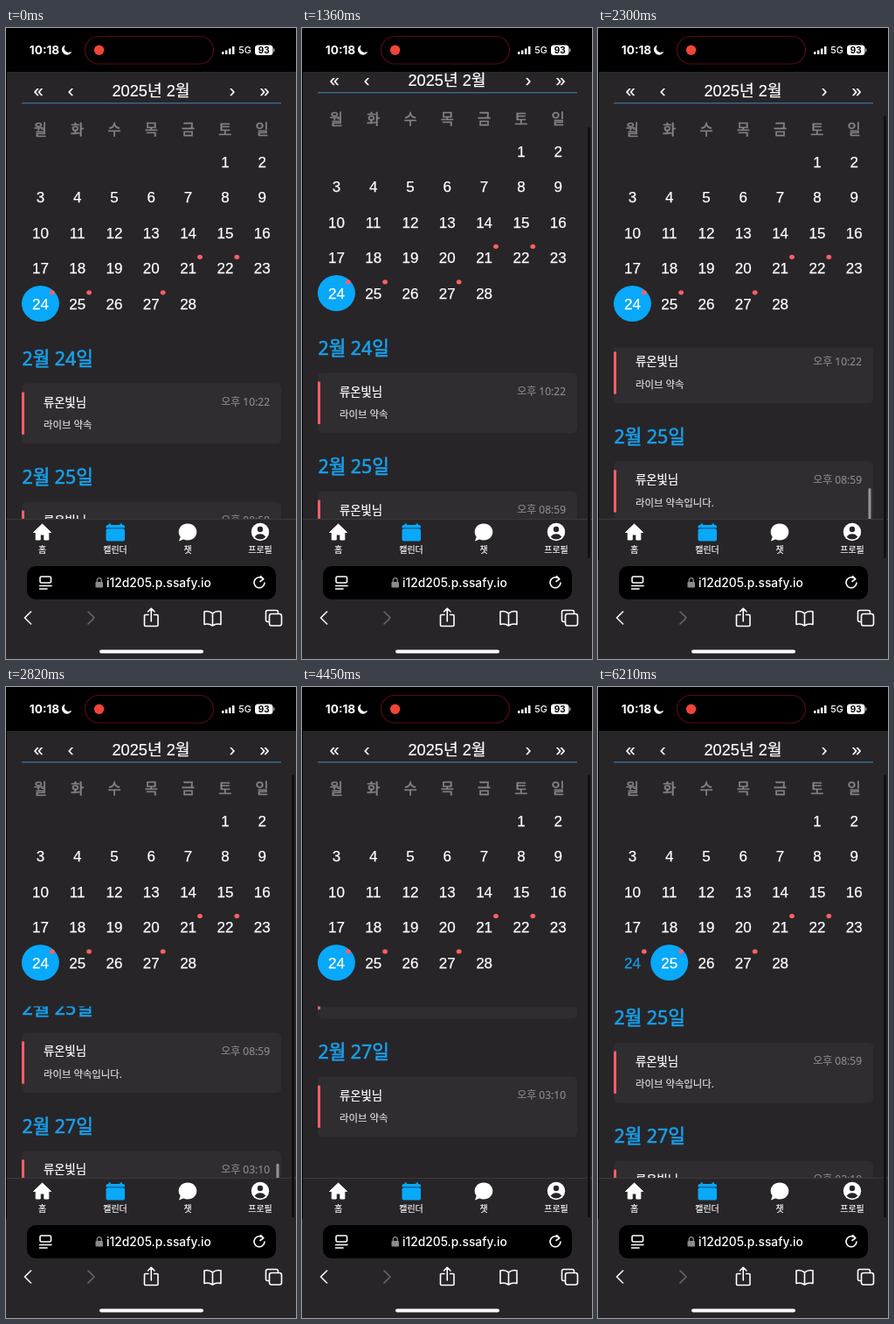
These frames come from a looping animation (332 px wide and 720 px high, 6.24 s). An HTML page:

```html
<!DOCTYPE html>
<html lang="ko">
<head>
<meta charset="utf-8">
<title>Calendar</title>
<style>
  html, body { margin: 0; width: 100%; height: 100%; overflow: hidden; background: #000; }
  svg { display: block; width: 100vw; height: 100vh; }
  .sans { font-family: "Liberation Sans", "Noto Sans CJK KR", "Noto Sans CJK", sans-serif; }
  .ko { font-family: "Noto Sans", "Noto Sans CJK KR", "Noto Sans CJK", sans-serif; }
  .ui { font-family: Inter, sans-serif; }
  .line { fill: none; stroke: #fff; stroke-width: 1.6; stroke-linecap: round; stroke-linejoin: round; }
</style>
</head>
<body>
<svg id="stage" viewBox="0 0 332 720" xmlns="http://www.w3.org/2000/svg">
  <defs>
    <clipPath id="pageClip"><rect y="50" width="332" height="510"/></clipPath>
    <clipPath id="listClip"><rect y="364.5" width="332" height="300"/></clipPath>
  </defs>
  <rect width="332" height="720" fill="#000"/>
  <rect x="1" y="50" width="331" height="557" fill="#272528"/>

  <g clip-path="url(#pageClip)">
    <g id="page">
      <g id="month"></g>
      <g clip-path="url(#listClip)"><g id="list"></g></g>
    </g>
    <rect id="thumb" x="309.5" width="3" height="60" rx="1.5" fill="#969497"/>
  </g>

  <g id="nav">
    <rect x="1" y="560" width="331" height="47" fill="#272528"/>
    <path d="M1 560.5H332" stroke="#3b393c"/>
    <path d="M41.5 566L51.5 575.5H48.8V584H43.8V578H39.2V584H34.2V575.5H31.5Z" fill="#fff" stroke="#fff" stroke-linejoin="round"/>
    <g fill="#08a8fb">
      <rect x="114.500" y="571.300" width="21.500" height="14.200" rx="2"/>
      <path d="M114.500 570.500V569Q114.500 567 116.500 567H117.500V565.500H120V567H130.500V565.500H133V567H134Q136 567 136 569V570.500Z"/>
    </g>
    <path d="M208 565.5C214 565.5 218.3 569.7 218.3 575S214 584.5 208 584.5C206.3 584.5 204.6 584.2 203.2 583.5L198 585.5L199.7 580.5C198.4 579 197.7 577 197.7 575C197.7 569.7 202 565.5 208 565.5Z" fill="#fff"/>
    <circle cx="291" cy="575" r="10.2" fill="#fff"/>
    <circle cx="291" cy="572" r="3.2" fill="#272528"/>
    <path d="M284.7 580.7Q287 577.3 291 577.3T297.3 580.7Q295 583.4 291 583.4T284.7 580.7Z" fill="#272528"/>
  </g>
  <rect id="pageBar" x="327" width="3" rx="1.5" fill="#111012"/>

  <g id="browser">
    <rect y="607" width="332" height="113" fill="#272528"/>
    <rect x="24" y="614" width="285" height="38" rx="10" fill="#000"/>
    <g class="line">
      <rect x="39" y="626" width="12.5" height="7" rx="1.5"/>
      <path d="M38.5 636.5H52M38.5 640H47"/>
      <path d="M294.5 628.8A6 6 0 1 0 296 633M291.5 625.5L294.8 628.8L291 631.5"/>
      <path d="M28.5 666L21.5 673L28.5 680"/>
      <path d="M94 666L101 673L94 680" stroke="#69676a"/>
      <path d="M163 669.5H159.5Q158.5 669.5 158.5 670.5V681.5Q158.5 682.5 159.5 682.5H173Q174 682.5 174 681.5V670.5Q174 669.5 173 669.5H169.5M166.25 677V662.5M162.5 666L166.25 662.3L170 666"/>
      <path d="M236.5 668Q232 664.5 227 666V680.5Q232 679 236.5 682Q241 679 246 680.5V666Q241 664.5 236.5 668V682"/>
      <path d="M301 677.5H299.5Q297.5 677.5 297.5 675.5V666.5Q297.5 664.5 299.5 664.5H309.5Q311.5 664.5 311.5 666.5V668"/>
      <rect x="301.5" y="668.5" width="14" height="13.5" rx="2.5"/>
    </g>
    <rect x="102.5" y="632" width="8.5" height="6.5" rx="1.2" fill="#8b898c"/>
    <path d="M104.3 632V630A2.45 2.45 0 0 1 109.2 630V632" fill="none" stroke="#8b898c" stroke-width="1.3"/>
    <rect x="107" y="709.5" width="119" height="4" rx="2" fill="#fff"/>
  </g>

  <g id="status">
    <rect width="332" height="50" fill="#000"/>
    <rect x="90.5" y="9.5" width="147" height="31.5" rx="15.75" fill="#000" stroke="#570b16" stroke-width="1.2"/>
    <circle cx="106.6" cy="25.3" r="5.7" fill="#f24439"/>
    <path d="M67 20A5.5 5.5 0 1 0 74.500 27.600A5.500 5.500 0 0 1 67 20Z" fill="#fff" stroke="#fff" stroke-linejoin="round"/>
    <path d="M247 27h2.5v3h-2.500zM251 25.500h2.500v4.500h-2.500zM255 23.500h2.500v6.500h-2.500zM259 21h2.500v9h-2.500z" fill="#fff"/>
    <rect x="285" y="19.5" width="20.5" height="11.5" rx="3.5" fill="#fff"/>
    <rect x="306.2" y="23.3" width="1.3" height="4" rx=".6" fill="#aaa"/>
  </g>
</svg>
<script>
const LOOP = 6240, PICK_TIME = 5400;
const BLUE = '#08a8fb', RED = '#fb5f65', CARD = '#2f2d30';
const $ = id => document.getElementById(id);

function add(parent, tag, attrs, content) {
  const node = document.createElementNS('http://www.w3.org/2000/svg', tag);
  for (const key in attrs) node.setAttribute(key, attrs[key]);
  if (content !== undefined) node.textContent = content;
  parent.append(node);
  return node;
}

// "heft" thickens the strokes between the installed weights
function label(parent, content, x, y, size, { font = 'ko', color = '#fff', weight = 400, anchor = 'middle', heft = 0 } = {}) {
  return add(parent, 'text', {
    x, y, class: font, 'font-size': size, 'font-weight': weight, 'text-anchor': anchor,
    fill: color, stroke: heft ? color : 'none', 'stroke-width': heft
  }, content);
}

function tint(node, color) {
  node.setAttribute('fill', color);
  node.setAttribute('stroke', color);
}

const columnX = col => 39.4 + col * 42.3;
const rowY = row => 153 + row * 40.5;
const cell = day => ({ x: columnX((day + 4) % 7), y: rowY(Math.floor((day + 4) / 7)) });

// Month view
const month = $('month'), dayText = {};
[['«', 37], ['‹', 74], ['›', 259], ['»', 296]].forEach(([mark, x]) =>
  label(month, mark, x, 78.3, 20, { font: 'sans', heft: .25 }));
label(month, '2025년 2월', 166, 78.2, 18.2, { font: 'sans', heft: .2 });
add(month, 'path', { d: 'M18 85.8H315', stroke: '#4386b4' });
[...'월화수목금토일'].forEach((name, col) =>
  label(month, name, columnX(col), 122, 16.5, { font: 'sans', color: '#858386', heft: .5 }));

function disc(fill) {
  return add(month, 'ellipse', { rx: 21.5, ry: 20.5, fill });
}
function moveDisc(node, day) {
  const { x, y } = cell(day);
  node.setAttribute('cx', x);
  node.setAttribute('cy', y - .5);
}
const hoverDisc = disc('#e6e5e7'), activeDisc = disc(BLUE);
moveDisc(hoverDisc, 23);

for (let day = 1; day <= 28; day++) {
  const { x, y } = cell(day);
  dayText[day] = label(month, day, x, y + 5.6, 17, { font: 'sans', heft: .25 });
}
for (const day of [21, 22, 24, 25, 27]) {
  const { x, y } = cell(day);
  add(month, 'ellipse', { cx: x + 13.4, cy: y - 13.2, rx: 2.9, ry: 2.6, fill: RED });
}

// Appointment list
const list = $('list');
const sections = [
  [24, '10:22', '라이브 약속'],
  [25, '08:59', '라이브 약속입니다.'],
  [27, '03:10', '라이브 약속']
].map(([day, time, note]) => {
  const g = add(list, 'g', {});
  label(g, `2월 ${day}일`, 18.5, 385.3, 21.3, { color: '#199fe9', anchor: 'start', heft: .6 });
  add(g, 'rect', { x: 18, y: 405.5, width: 297, height: 69, rx: 6, fill: CARD });
  add(g, 'rect', { x: 18, y: 415.5, width: 3, height: 48.5, rx: 1, fill: RED });
  label(g, '류온빛님', 43, 431.7, 13.3, { anchor: 'start', heft: .25 });
  label(g, `오후 ${time}`, 302, 431.2, 12, { color: '#8b898c', anchor: 'end', heft: .15 });
  label(g, note, 43, 457.3, 11.4, { color: '#e6e5e7', anchor: 'start', heft: .15 });
  return g;
});

// Fixed bars
[['홈', 41.5], ['캘린더', 125], ['챗', 208], ['프로필', 291]].forEach(([name, x]) =>
  label($('nav'), name, x, 599.3, 10, { heft: .15 }));
label($('browser'), 'i12d205.p.ssafy.io', 115, 638, 13.8, { font: 'ui', weight: 500, anchor: 'start' });
label($('status'), '10:18', 44, 30, 13.6, { font: 'ui', weight: 700 });
label($('status'), '5G', 273.5, 29.3, 10.8, { font: 'ui', weight: 500 });
label($('status'), '93', 295.2, 29, 10, { font: 'ui', weight: 700, color: '#000' });

function track(t, keys) {
  let [t0, v0] = keys[0];
  for (const [t1, v1] of keys) {
    if (t < t1) {
      const p = Math.max(0, (t - t0) / (t1 - t0));
      return v0 + (v1 - v0) * p;
    }
    [t0, v0] = [t1, v1];
  }
  return v0;
}

const pageScroll = t => track(t, [[1300, 0], [1350, 12], [1580, 12], [1700, 8], [1860, 0]]);

// Momentum scroll that stops at the end of the list
function listScroll(t) {
  if (t < 2147 || t >= PICK_TIME) return 0;
  return Math.min(231, 241 * (1 - Math.exp((2147 - t) / 722)));
}

function render(t) {
  const page = pageScroll(t), scroll = listScroll(t);
  const picked = t >= PICK_TIME ? 25 : 24;
  const hovering = t >= 1580 && t < 1880;

  $('page').setAttribute('transform', `translate(0 ${-page})`);
  list.setAttribute('transform', `translate(0 ${-scroll})`);
  const first = picked === 25 ? 1 : 0;
  sections.forEach((g, i) => {
    g.style.display = i < first ? 'none' : '';
    g.setAttribute('transform', `translate(0 ${(i - first) * 135})`);
  });

  moveDisc(activeDisc, picked);
  hoverDisc.style.display = hovering ? '' : 'none';
  tint(dayText[23], hovering ? '#1ba1eb' : '#fff');
  tint(dayText[24], picked === 24 ? '#fff' : '#199fe9');

  const barTop = 100 + page * 1.08;
  $('pageBar').style.display = t >= 1300 ? '' : 'none';
  $('pageBar').setAttribute('y', barTop);
  $('pageBar').setAttribute('height', 605 - barTop);
  $('thumb').style.display = scroll > 0 && scroll < 231 ? '' : 'none';
  $('thumb').setAttribute('y', 525 + (scroll - 46) * .187);
}

const start = performance.now();
function tick() {
  render((performance.now() - start) % LOOP);
  requestAnimationFrame(tick);
}
render(0);
requestAnimationFrame(tick);
</script>
</body>
</html>
```
